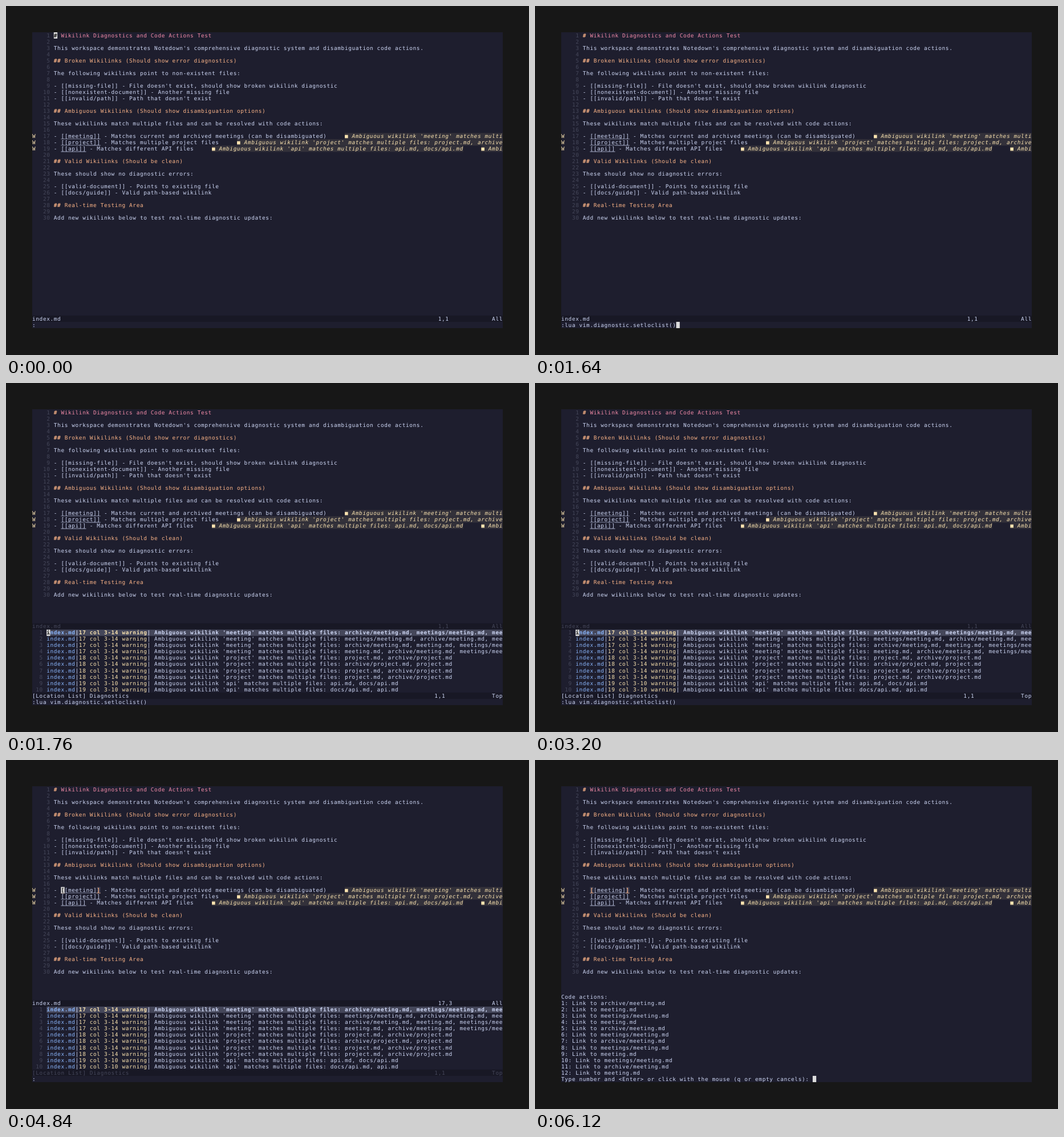
An HTML page with a canvas for the animation above (8000 ms loop, 917 px wide and 611 px high).

```html
<!DOCTYPE html>
<html lang="en">
<head>
<meta charset="utf-8">
<title>Editor diagnostics</title>
<style>
  html, body { margin: 0; width: 100%; height: 100%; overflow: hidden; background: #171717; }
  canvas { display: block; }
</style>
</head>
<body>
<canvas id="stage" width="917" height="611"></canvas>
<script>
const ctx = document.getElementById('stage').getContext('2d');
const LOOP = 8000, COLS = 131, ROWS = 47;
const CELL_W = 8, CELL_H = 14, SCALE = 825 / (COLS * CELL_W), ORIGIN = 46;
const color = {
  page: '#171717', base: '#1e1e2e', bar: '#181825', dim: '#45475a', text: '#cdd6f4',
  red: '#f38ba8', peach: '#fab387', yellow: '#f9e2af', blue: '#89b4fa',
  hint: '#33313a', match: '#393b4d', cursor: '#dddddd'
};

const documentLines = `# Wikilink Diagnostics and Code Actions Test

This workspace demonstrates Notedown's comprehensive diagnostic system and disambiguation code actions.

## Broken Wikilinks (Should show error diagnostics)

The following wikilinks point to non-existent files:

- [[missing-file]] - File doesn't exist, should show broken wikilink diagnostic
- [[nonexistent-document]] - Another missing file
- [[invalid/path]] - Path that doesn't exist

## Ambiguous Wikilinks (Should show disambiguation options)

These wikilinks match multiple files and can be resolved with code actions:

- [[meeting]] - Matches current and archived meetings (can be disambiguated)
- [[project]] - Matches multiple project files
- [[api]] - Matches different API files

## Valid Wikilinks (Should be clean)

These should show no diagnostic errors:

- [[valid-document]] - Points to existing file
- [[docs/guide]] - Valid path-based wikilink

## Real-time Testing Area

Add new wikilinks below to test real-time diagnostic updates:`.split('\n');

const ambiguous = (name, files) =>
  `Ambiguous wikilink '${name}' matches multiple files: ` +
  files.map(dir => `${dir}${name}.md`).join(', ');
const A = 'archive/', M = 'meetings/', D = 'docs/', TOP = '';

const warnings = [
  [17, 'meeting', [A, M, TOP]], [17, 'meeting', [M, A, TOP]],
  [17, 'meeting', [A, TOP, M]], [17, 'meeting', [TOP, A, M]],
  [18, 'project', [TOP, A]], [18, 'project', [A, TOP]],
  [18, 'project', [TOP, A]], [18, 'project', [TOP, A]],
  [19, 'api', [TOP, D]], [19, 'api', [D, TOP]]
].map(([line, name, files]) => ({
  line, span: `3-${name.length + 7}`, message: ambiguous(name, files)
}));
const inlineHints = {
  17: [warnings[0]],
  18: [warnings[4]],
  19: [warnings[8], warnings[9]]
};
const actionDirs = [A, TOP, M, TOP, A, M, A, M, TOP, M, A, TOP];

const LIST_COMMAND = ':lua vim.diagnostic.setloclist()';
const ACTION_COMMAND = ':lua vim.lsp.buf.code_action()';
const PROMPT = 'Type number and <Enter> or click with the mouse (q or empty cancels): ';

function fillCells(row, col, width, fill, height = 1) {
  ctx.fillStyle = fill;
  ctx.fillRect(col * CELL_W, row * CELL_H, width * CELL_W, height * CELL_H);
}

// Writes text on the character grid and returns the column after it.
function put(row, col, text, fg = color.text, { bg, style = '', underline } = {}) {
  const shown = text.slice(0, Math.max(0, COLS - col));
  if (bg) fillCells(row, col, shown.length, bg);
  ctx.font = `${style} 12px "DejaVu Sans Mono", monospace`;
  ctx.fillStyle = fg;
  [...shown].forEach((char, i) => {
    if (char !== ' ') ctx.fillText(char, (col + i) * CELL_W, row * CELL_H + 11);
  });
  if (underline) ctx.fillRect(col * CELL_W, (row + 1) * CELL_H - 1, shown.length * CELL_W, 1);
  return col + text.length;
}

function cursor(row, col, char = ' ', style = '') {
  put(row, col, char, color.page, { bg: color.cursor, style });
}

function drawDocumentLine(text, row) {
  const line = row + 1;
  put(row, 2, String(line).padStart(3), color.dim);

  const heading = text.match(/^(#+)(.*)/);
  if (heading) {
    const col = put(row, 6, heading[1], color.peach, { style: 'bold' });
    put(row, col, heading[2], heading[1] === '#' ? color.red : color.peach);
    return;
  }

  let col = put(row, 6, text);
  const hints = inlineHints[line];
  if (!hints) return;
  put(row, 0, 'W', color.yellow);
  put(row, 8, text.match(/\[\[.*?\]\]/)[0], color.text, { bg: color.base, underline: true });
  for (const { message } of hints) {
    col = put(row, col + 5, '■ ' + message, color.yellow, { bg: color.hint, style: 'italic' });
  }
}

function statusBar(row, name, position, positionCol, extent, active) {
  const fg = active ? color.text : color.dim;
  fillCells(row, 0, COLS, color.bar);
  put(row, 0, name, fg);
  put(row, positionCol, position, fg);
  put(row, 128, extent, fg);
}

function drawWarningList() {
  warnings.forEach(({ line, span, message }, i) => {
    const row = 35 + i, style = i ? '' : 'bold';
    put(row, 0, String(i + 1).padStart(3), color.dim);
    if (!i) fillCells(row, 4, COLS - 4, color.dim);
    let col = put(row, 4, 'index.md', color.blue, { style });
    col = put(row, col, '|', color.text, { style });
    col = put(row, col, `${line} col ${span} warning`, color.yellow, { style });
    put(row, col, '| ' + message, color.text, { style });
  });
}

function drawActionMenu() {
  put(33, 0, 'Code actions:');
  actionDirs.forEach((dir, i) => put(34 + i, 0, `${i + 1}: Link to ${dir}meeting.md`));
  cursor(46, put(46, 0, PROMPT));
}

function listCommandLength(t) {
  if (t < 40) return 1;
  if (t < 920) return Math.min(18, 2 + Math.floor((t - 40) / 50));
  return Math.min(LIST_COMMAND.length, 19 + Math.floor((t - 920) / 55));
}

function actionCommandLength(t) {
  return Math.min(ACTION_COMMAND.length, 1 + Math.floor((t - 4840) / 42));
}

function draw(t) {
  ctx.setTransform(1, 0, 0, 1, 0, 0);
  ctx.fillStyle = color.page;
  ctx.fillRect(0, 0, 917, 611);
  ctx.setTransform(SCALE, 0, 0, SCALE, ORIGIN, ORIGIN);
  ctx.textRendering = 'geometricPrecision';

  if (t >= 1720 && t < 1760) {
    cursor(46, LIST_COMMAND.length);
    return;
  }

  fillCells(0, 0, COLS, color.base, ROWS);
  documentLines.forEach(drawDocumentLine);

  if (t < 1720) {
    statusBar(45, 'index.md', '1,1', 113, 'All', true);
    const end = put(46, 0, LIST_COMMAND.slice(0, listCommandLength(t)));
    if (t < 40) cursor(0, 6, '#', 'bold');
    else cursor(46, end);
    return;
  }

  const jumped = t >= 3240;
  if (jumped) {
    const bracket = { bg: color.match, style: 'bold', underline: true };
    put(16, 8, '[', color.peach, bracket);
    put(16, 18, ']', color.peach, bracket);
  }
  if (t >= 6120) {
    drawActionMenu();
    return;
  }

  statusBar(34, 'index.md', jumped ? '17,3' : '1,1', 113, 'All', jumped);
  drawWarningList();
  statusBar(45, '[Location List] Diagnostics', '1,1', 112, 'Top', !jumped);

  const command = t < 4840 ? LIST_COMMAND : ACTION_COMMAND.slice(0, actionCommandLength(t));
  const end = put(46, 0, command);
  if (!jumped) cursor(35, 4, 'i', 'bold');
  else if (t < 4880) cursor(16, 8, '[', 'bold');
  else cursor(46, end);
}

let start;
function tick(now) {
  start ??= now;
  draw((now - start) % LOOP);
  requestAnimationFrame(tick);
}
requestAnimationFrame(tick);
</script>
</body>
</html>
```
